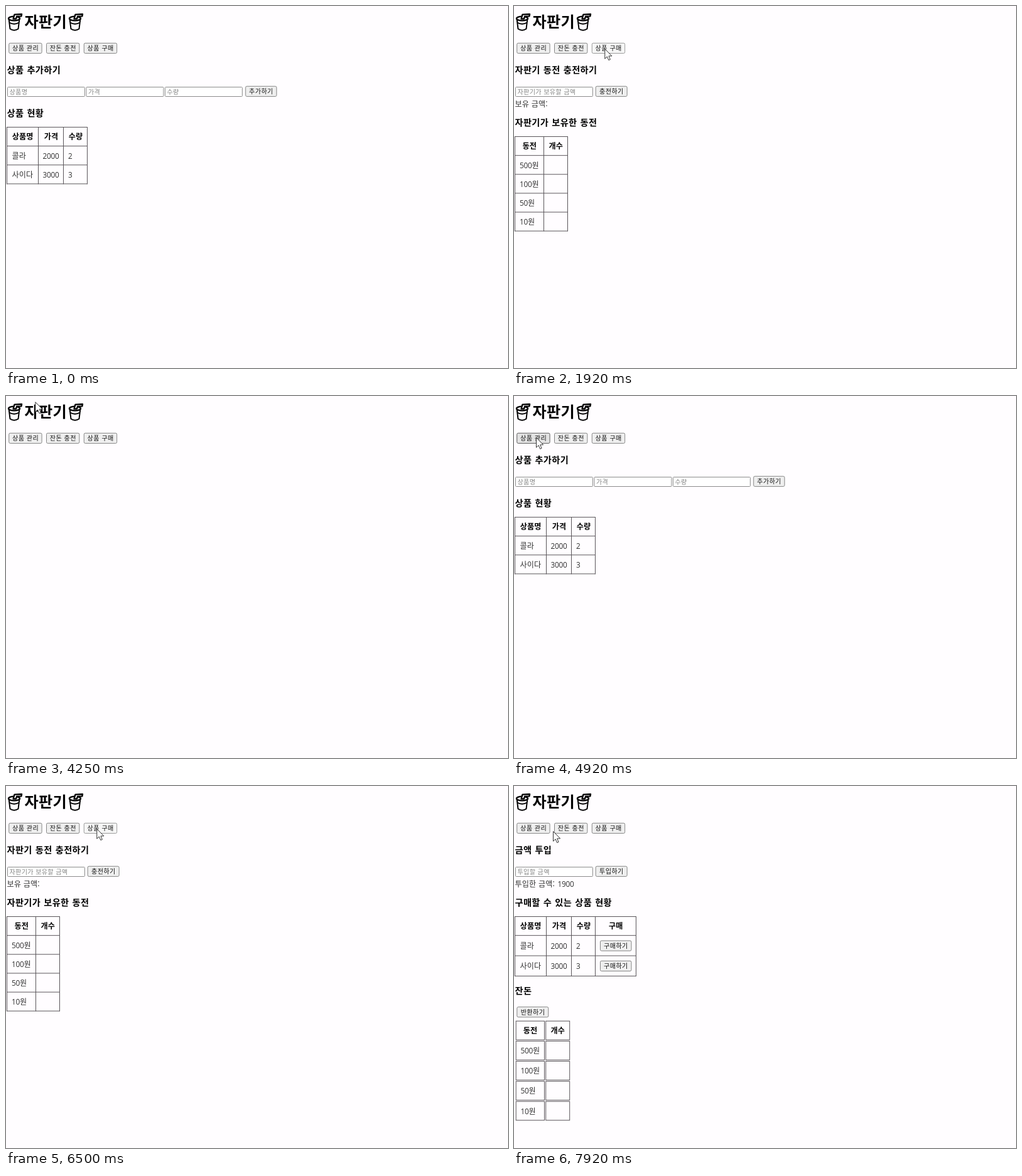
An HTML page for the animation above (8000 ms loop, 800 px wide and 578 px high).

```html
<!DOCTYPE html>
<html lang="ko">
<head>
<meta charset="utf-8">
<title>자판기</title>
<style>
  html, body { margin: 0; width: 100%; height: 100%; overflow: hidden; background: #fffdff; }
  svg { display: block; }
  text { font: 12.1px "Noto Sans CJK KR", "Noto Sans CJK", sans-serif; letter-spacing: .1px; word-spacing: .4px; fill: #333; }
  .h1 { font-size: 24.2px; font-weight: 700; letter-spacing: .2px; fill: #000; }
  .h3 { font-size: 14.2px; font-weight: 700; letter-spacing: .35px; word-spacing: .8px; fill: #000; }
  .th { font-weight: 700; text-anchor: middle; fill: #000; }
  .label, .hint { font-size: 10.1px; letter-spacing: .4px; word-spacing: .2px; }
  .label { text-anchor: middle; fill: #111; }
  .hint { letter-spacing: .3px; fill: #858585; }
  .num { font-family: "Open Sans", "Noto Sans", sans-serif; font-size: 11.8px; letter-spacing: -.22px; }
  .grid { fill: none; stroke: #5a565a; }
  .input { fill: #fff; stroke: #8c8c8c; }
  .btn { fill: #efefef; stroke: #858585; }
  .btn.hover { fill: #e3e3e3; stroke: #5c5c5c; }
  .btn.down { fill: #f6f6f6; stroke: #999; }
</style>
</head>
<body>
<svg id="stage" width="800" height="578" viewBox="0 0 800 578"></svg>
<script>
const stage = document.getElementById('stage');
const each = (list, fn) => list.map(fn).join('');

// y is the visual middle of the line
const text = (cls, size) => (x, y, s) =>
  `<text class="${cls}" x="${x}" y="${y + size * 0.37}">${s}</text>`;
const h1 = text('h1', 24.2), h3 = text('h3', 14.2), th = text('th', 12.1);
const body = text('body', 12.1), num = text('num', 12.1);
const label = text('label', 10.1), hint = text('hint', 10.1);
const rect = (cls, x, y, w, h, r = 0) =>
  `<rect class="${cls}" x="${x}" y="${y}" width="${w}" height="${h}" rx="${r}"/>`;
const button = (x, y, w, s) => rect('btn', x, y, w, 16.2, 2) + label(x + w / 2 + .2, y + 8, s);
const input = (i, s) => rect('input', 2.5 + 125.5 * i, 129.5, 123, 15, 1) + hint(5.5 + 125.5 * i, 137, s);

// Ruled table with a 30px head and `count` rows below it
function grid(y, xs, row, count) {
  const bottom = y + 30.15 + row * count, right = xs[xs.length - 1];
  let d = `M1.5 ${y}H${right}` + each(xs, x => `M${x} ${y}V${bottom}`);
  for (let i = 0; i <= count; i++) d += `M1.5 ${y + 30.15 + row * i}H${right}`;
  return `<path class="grid" stroke-linecap="square" d="${d}"/>`;
}

const goodsCols = [1.5, 51.5, 91.5, 129.5];
const goods = [['콜라', 2000, 2], ['사이다', 3000, 3]];
const goodsHead = y => th(26.7, y, '상품명') + th(72, y, '가격') + th(111, y, '수량');
const goodsRow = ([name, price, count], y) => body(9.5, y, name) + num(58.5, y, price) + num(99, y, count);
const coinRows = (x, y, step) => each([500, 100, 50, 10], (n, i) =>
  `<text x="${x}" y="${y + step * i + 4.5}"><tspan class="num">${n}</tspan>원</text>`);

const cup = x => `<g transform="translate(${x} 0)" fill="#fffdff" stroke="#000" stroke-width="2" stroke-linejoin="round">
  <path d="M4.5 20L6.5 36.5Q13 41 19.5 36.5L21.5 20Z"/>
  <path d="M5.3 26.5Q13 31 20.7 26.5" fill="none"/>
  <ellipse cx="13" cy="20" rx="9" ry="3.4" stroke-width="2.4"/>
  <path d="M11.5 20.5L13.5 13.6L25 13L24.4 16.4L17 16.8L16 20.5Z" stroke-width="2.4"/></g>`;

const pages = {
  blank: '',
  add: h3(1.5, 102, '상품 추가하기')
    + each(['상품명', '가격', '수량'], (s, i) => input(i, s))
    + button(381.8, 128.2, 49.4, '추가하기')
    + h3(1.5, 171, '상품 현황')
    + grid(193.5, goodsCols, 30.15, 2)
    + goodsHead(209) + each(goods, (g, i) => goodsRow(g, 239.5 + 30 * i)),
  charge: h3(1.5, 102, '자판기 동전 충전하기')
    + input(0, '자판기가 보유할 금액') + button(130.2, 128.2, 50, '충전하기')
    + body(1.5, 156.5, '보유 금액:')
    + h3(1.5, 186, '자판기가 보유한 동전')
    + grid(208.5, [1.5, 47.5, 85.5], 30.15, 4)
    + th(24.7, 224, '동전') + th(66.7, 224, '개수') + coinRows(9, 254.5, 30),
  buy: h3(1.5, 102, '금액 투입')
    + input(0, '투입할 금액') + button(130.2, 128.2, 50, '투입하기')
    + body(1.5, 156.5, '투입한 금액:') + num(69.5, 156.5, 1900)
    + h3(1.5, 186, '구매할 수 있는 상품 현황')
    + grid(208.5, [...goodsCols, 194.5], 32.4, 2)
    + goodsHead(224) + th(162.2, 224, '구매')
    + each(goods, (g, i) => goodsRow(g, 256 + 32 * i) + button(137.5, 247 + 32.3 * i, 49.5, '구매하기'))
    + h3(1.5, 327, '잔돈') + button(4.8, 352.8, 50, '반환하기')
    + each([0, 1, 2, 3, 4], i =>
        rect('grid', 3.2, 375.3 + 32.1 * i, 45.3, 30) + rect('grid', 50.7, 375.3 + 32.1 * i, 38, 30))
    + th(26, 390.3, '동전') + th(69.7, 390.3, '개수') + coinRows(10.5, 422.5, 32.2)
};

const tabX = i => 4.7 + 59.8 * i, TAB_W = 52.4;
const tabs = each(['상품 관리', '잔돈 충전', '상품 구매'], (s, i) => button(tabX(i), 59.3, TAB_W, s));
stage.innerHTML = cup(0) + h1(29.5, 25, '자판기') + cup(97) + `<g id="tabs">${tabs}</g>`
  + each(Object.keys(pages), k => `<g id="${k}">${pages[k]}</g>`)
  + `<path id="cursor" d="M.5 .5V16.2L4.1 12.8L6.6 18.5L9.1 17.4L6.7 11.9H11.7Z"
      fill="#fff" stroke="#333" stroke-linejoin="round"/>`;

const cursor = document.getElementById('cursor');
const tabBoxes = [...document.querySelectorAll('#tabs .btn')];
const pageNodes = Object.keys(pages).map(k => document.getElementById(k));

// Everything below is timed in ticks, 12 per second
const LOOP = 8000;
const shows = [[0, 'add'], [15, 'charge'], [24, 'buy'], [45, 'blank'], [59, 'add'], [69, 'charge'], [79, 'buy']];

const spot = {
  side: [515, 203], top: [48, 1], gap: [61, 76.5], low: [62, 72],
  add: [35, 66], charge: [80, 67], buy: [144.3, 68], edge: [69, 71]
};
const smooth = f => f * f * (3 - 2 * f);
const slow = f => 1 - (1 - f) ** 2;
const moves = [
  [4, 9, 'side', 'gap', slow], [9, 12, 'gap', 'charge', smooth],
  [17, 21, 'charge', 'buy', smooth], [30, 39, 'buy', 'top', smooth],
  [49, 58, 'top', 'add', smooth], [62, 67, 'add', 'charge', smooth],
  [70, 76, 'charge', 'buy', smooth], [83, 93, 'buy', 'edge', smooth], [94, 95, 'edge', 'low', smooth]
];

function pointer(k) {
  const move = moves.filter(m => m[0] <= k).pop();
  if (!move) return null;
  const [from, to, a, b, ease] = move;
  if (b === 'top' && k > to) return null;
  const f = ease(Math.min(1, (k - from) / (to - from)));
  return spot[a].map((v, i) => v + (spot[b][i] - v) * f);
}

function draw(ms) {
  const k = Math.floor((ms % LOOP + 3.4) * 0.012);
  const page = shows.filter(s => s[0] <= k).pop()[1];
  for (const n of pageNodes) n.style.display = n.id === page ? '' : 'none';

  const p = pointer(k);
  cursor.style.display = p ? '' : 'none';
  if (p) cursor.setAttribute('transform', `translate(${p[0]} ${p[1]})`);

  // the button is down for the tick before the page changes
  const state = shows.some(s => s[0] === k + 1) ? ' down' : ' hover';
  tabBoxes.forEach((box, i) => {
    const over = p && p[0] >= tabX(i) && p[0] <= tabX(i) + TAB_W && p[1] >= 59 && p[1] <= 76;
    box.setAttribute('class', 'btn' + (over ? state : ''));
  });
}

const start = performance.now();
function tick() {
  draw(performance.now() - start);
  requestAnimationFrame(tick);
}
tick();
</script>
</body>
</html>
```
